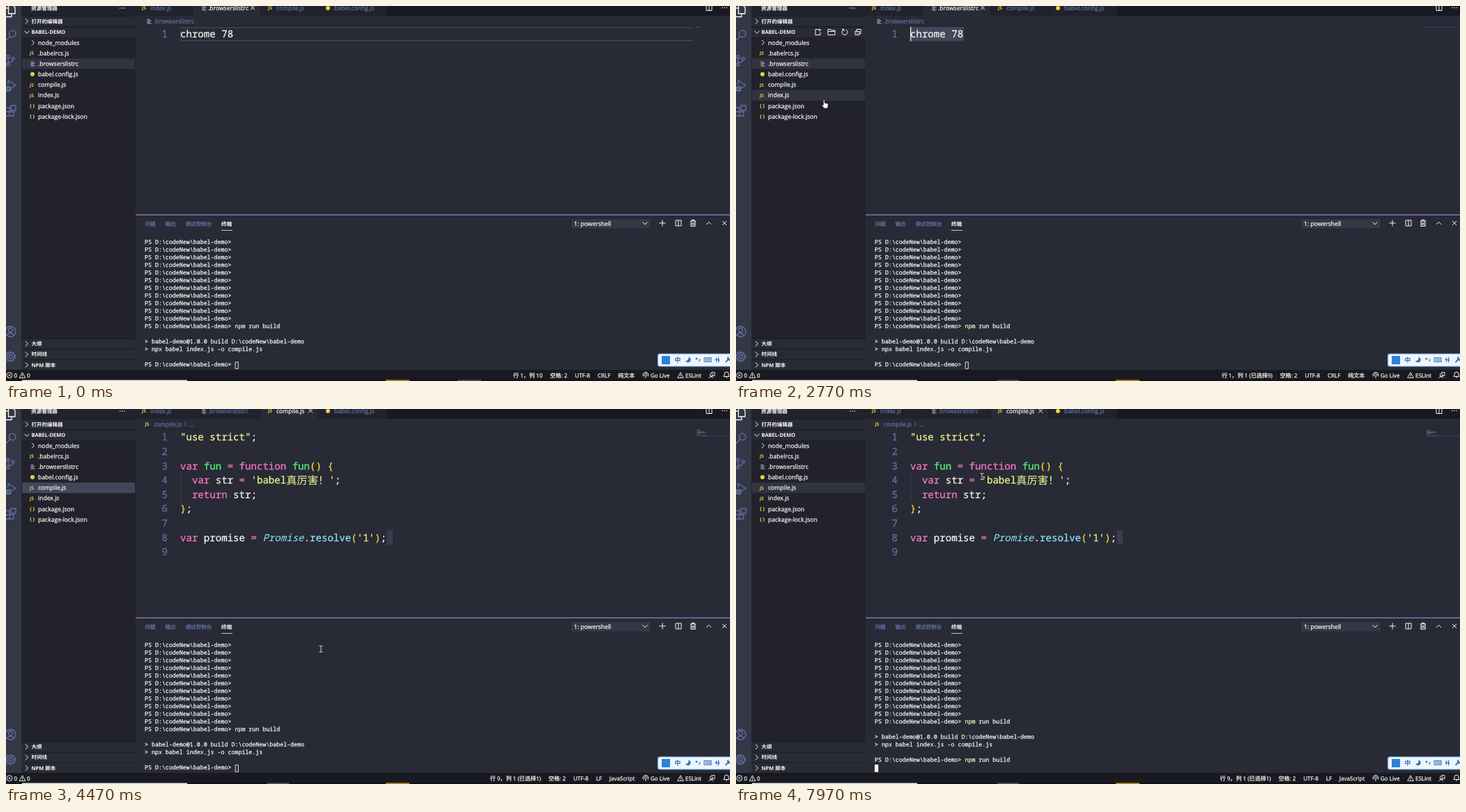
These frames come from a looping animation (1039 px wide and 539 px high, 8 s). An HTML page with a canvas:

```html
<!DOCTYPE html>
<html lang="zh">
<head>
<meta charset="utf-8">
<title>Editor</title>
<style>
html, body { margin: 0; width: 100%; height: 100%; overflow: hidden; background: #282a36; }
canvas { display: block; }
</style>
</head>
<body>
<canvas id="stage" width="1039" height="539"></canvas>
<script>
const ctx = document.getElementById('stage').getContext('2d');
const LOOP = 8000;
const UI = '"Open Sans", "Noto Sans CJK SC", "Noto Sans CJK", sans-serif';
const MONO = '"Noto Sans Mono", "Noto Sans CJK SC", "Noto Sans CJK", monospace';
const CJK = '"Noto Sans CJK SC", "Noto Sans CJK", sans-serif';
const BG = '#282a36', SIDE = '#21222c', DARK = '#191a21', WHITE = '#f8f8f2',
  DIM = '#6272a4', SELECT = '#44475a', SOFT = '#313341', YELLOW = '#e6d33c';
const LINE = 20.6, ROW = 15.17;

// Pointer phases: start, end, number of steps, then (step, x, y) points.
const moves = [
  [130, 670, 8, 0, 908, 519, 3, 760, 380, 7, 515, 163],
  [830, 1620, 11, 0, 460, 130, 4, 330, 41, 7, 329, 40, 10, 280, 38],
  [1680, 1760, 2, 0, 256, 36, 1, 239, 36],
  [1990, 2370, 6, 0, 238, 40, 5, 234, 155],
  [2540, 3310, 11, 0, 180, 150, 3, 128, 141, 7, 86, 133, 10, 84, 131],
  [3380, 3610, 4, 0, 83, 131, 3, 82, 117],
  [3850, 3850, 1, 0, 89, 115],
  [4000, 4790, 11, 0, 90, 123, 3, 86, 119, 4, 240, 225, 6, 452, 345, 10, 453, 361],
  [4870, 4940, 2, 0, 452, 355, 1, 451, 350],
  [6650, 6960, 5, 0, 456, 330, 2, 520, 240, 4, 493, 187],
  [7110, 7890, 11, 0, 480, 180, 4, 264, 150, 7, 300, 84, 10, 368, 130],
  [7970, 7970, 1, 0, 353, 97]
];
const presses = [[1300, 1990], [3150, 3310], [4158, 4237], [4632, 4790]];

const files = [
  ['node_modules', 'dir'], ['.babelrcs.js', 'js'], ['.browserslistrc', 'list'],
  ['babel.config.js', 'dot'], ['compile.js', 'js'], ['index.js', 'js'],
  ['package.json', 'json'], ['package-lock.json', 'json']
];
const tabs = [
  [186, 268, 195, 207, 256, 'index.js', 'js'],
  [268, 366, 280, 290, 354, '.browserslistrc', 'list'],
  [366, 449, 376, 388, 437, 'compile.js', 'js'],
  [449, 547, 458, 471, 538, 'babel.config.js', 'dot']
];

// "~" starts a token, the next letter is its colour.
const inks = { w: WHITE, p: '#ff79c6', g: '#50fa7b', c: '#8be9fd', i: '#8be9fd',
  s: '#f1fa8c', z: '#f1fa8c', b: '#ffd82a' };
const call = "~wpromise ~p= ~iPromise~w.~cresolve~b(~s'1'~b)~w;";
const str = "~wstr ~p= ~s'babel~z真厉害！~s'~w;";
const docs = {
  list: { row: 2, tab: 1, lang: '纯文本', eol: 'CRLF', code: ['~wchrome 78'] },
  index: { row: 5, tab: 0, lang: 'JavaScript', eol: 'CRLF', guide: 1, code: [
    '~pconst ~gfun ~p= ~b() ~p=> ~b{', '~p  let ' + str, '~p  return ~wstr;',
    '~b}', '~plet ' + call] },
  compile: { row: 4, tab: 2, lang: 'JavaScript', eol: 'LF', guide: 3, code: [
    '~s"use strict"~w;', '', '~pvar ~gfun ~p= function ~gfun~b() {', '~p  var ' + str,
    '~p  return ~wstr;', '~b}~w;', '', '~pvar ' + call, ''] }
};

function rect(x, y, w, h, color) {
  ctx.fillStyle = color;
  ctx.fillRect(x, y, w, h);
}
function disc(x, y, r, color) {
  ctx.fillStyle = color;
  ctx.beginPath();
  ctx.arc(x, y, r, 0, 7);
  ctx.fill();
}
function stroke(d, color = WHITE, width = 1, x = 0, y = 0) {
  ctx.save();
  ctx.translate(x, y);
  ctx.strokeStyle = color;
  ctx.lineWidth = width;
  ctx.stroke(new Path2D(d));
  ctx.restore();
}
// Draws slightly emboldened text centred on y and returns its width.
function text(s, x, y, color = WHITE, size = 8.6, family = UI, style = '') {
  ctx.font = `${style} ${size}px ${family}`;
  ctx.fillStyle = ctx.strokeStyle = color;
  ctx.lineWidth = .25;
  ctx.fillText(s, x, y + size * .35);
  if (!style) ctx.strokeText(s, x, y + size * .35);
  return ctx.measureText(s).width;
}
const chevRight = (x, y) => stroke('M-2-3.5L1.5 0L-2 3.5', WHITE, 1, x, y);
const chevDown = (x, y) => stroke('M-3.5-2L0 1.5L3.5-2', WHITE, 1, x, y);
const cross = (x, y) => stroke('M-3-3L3 3M3-3L-3 3', WHITE, 1, x, y);
const dots = (x, y) => [-3.3, 0, 3.3].forEach(d => disc(x + d, y, .8, WHITE));
const splitIcon = (x, y) => stroke('M-4-4H4V4H-4ZM0-4V4', WHITE, 1, x, y);

function fileIcon(kind, x, y) {
  if (kind === 'js') text('JS', x, y, YELLOW, 6.6, UI, 'bold');
  if (kind === 'json') text('{ }', x, y - .3, YELLOW, 7, UI, 'bold');
  if (kind === 'dot') disc(x + 4, y, 3, YELLOW);
  if (kind === 'list') stroke('M1-2.6H5M1-.6H7M1 1.2H5M1 3H7', '#c5c8d6', .9, x + .5, y);
  if (kind === 'dir') chevRight(x + 5, y);
}

function pointer(t) {
  const m = moves.filter(v => v[0] <= t).pop();
  if (!m) return null;
  const [from, to, count, ...p] = m;
  const gap = count > 1 ? (to - from) / (count - 1) : 1;
  const step = Math.min(count - 1, Math.floor((t - from) / gap + .06));
  let k = 0;
  while (k + 3 < p.length && p[k + 3] <= step) k += 3;
  if (k + 3 >= p.length) return { x: p[k + 1], y: p[k + 2] };
  const f = (step - p[k]) / (p[k + 3] - p[k]);
  return { x: p[k + 1] + f * (p[k + 4] - p[k + 1]), y: p[k + 2] + f * (p[k + 5] - p[k + 2]) };
}

function activityBar() {
  rect(0, 0, 22, 523, '#343746');
  stroke('M3.5-2V11H13V2L10-1M3 3H-2V15.5H8V11', WHITE, 1.3);
  const icon = (d, y) => stroke(d, DIM, 1.3, 6, y);
  icon('M8-2A4.8 4.8 0 1 1-1.6-2A4.8 4.8 0 1 1 8-2M-.2 1.6L-6 7.5', 42);
  icon('M-5-5A2 2 0 1 1-1-5A2 2 0 1 1-5-5M-3-3V4M-5 6A2 2 0 1 1-1 6A2 2 0 1 1-5 6M2-2A2 2 0 1 1 6-2A2 2 0 1 1 2-2M4 0Q4 3-3 3', 78);
  icon('M-3-1V-7L8 0L0 5M-5 2H0V8H-5ZM-7 4H2M-7 7H2', 114);
  icon('M1-7H8V0H1ZM-6-4H-1V8H-6M-6 2H5V8H-6', 150);
  icon('M8 0A7.5 7.5 0 1 1-7 0A7.5 7.5 0 1 1 8 0M3.5-2A3 3 0 1 1-2.5-2A3 3 0 1 1 3.5-2M-4.5 6Q.5-2 5.5 6', 468);
  icon('M3 0A2.5 2.5 0 1 1-2 0A2.5 2.5 0 1 1 3 0', 504);
  ctx.setLineDash([2.9, 1.6]);
  icon('M7.5 0A7 7 0 1 1-6.5 0A7 7 0 1 1 7.5 0', 504);
  ctx.setLineDash([]);
  icon('M6 0A5.5 5.5 0 1 1-5 0A5.5 5.5 0 1 1 6 0', 504);
}

function sidebar(doc, mouse, focused) {
  rect(22, 0, 164, 523, SIDE);
  text('资源管理器', 36, 3, WHITE, 7.6);
  dots(167, 3);
  const section = (name, y, open) => {
    rect(22, y - 7.4, 164, 14.6, BG);
    rect(22, y - 8, 164, .8, DARK);
    open ? chevDown(30, y) : chevRight(30, y);
    text(name, 36.5, y, WHITE, 7.5, UI, 'bold');
  };
  section('打开的编辑器', 22);
  section('BABEL-DEMO', 37.8, true);
  section('大纲', 485.5);
  section('时间线', 500.8);
  section('NPM 脚本', 516);

  const inside = mouse && mouse.x < 185;
  const hover = inside ? Math.floor((mouse.y - 51) / ROW) : -1;
  files.forEach(([name, kind], i) => {
    const y = 52.6 + i * ROW;
    if (i === doc.row) rect(23, y - 7.6, 162, ROW, focused ? SELECT : SOFT);
    else if (i === hover) rect(23, y - 7.6, 162, ROW, SOFT);
    fileIcon(kind, 34, y);
    text(name, 46, y);
  });
  if (!inside) return;
  stroke('M1-4H-3V4H4V0M3-5V-1M1-3H5', WHITE, 1, 117, 37.5);
  stroke('M-5 4V-4H-1L0-2.5H5V4ZM-5-1H5', WHITE, 1, 137, 37.5);
  stroke('M2-3.5A4 4 0 1 1-2-3.5M-4-4H-1V-1', WHITE, 1, 156, 37.5);
  stroke('M-4-1H2V4H-4ZM-2-1V-4H4V2H2M-2 1.5H0', WHITE, 1, 175, 37.5);
}

function editor(doc, t) {
  rect(186, 0, 853, 14, DARK);
  tabs.forEach(([left, right, iconX, textX, closeX, name, kind], i) => {
    const active = i === doc.tab;
    rect(left, 0, right - left - .6, 14, active ? BG : SIDE);
    fileIcon(kind, iconX, 3);
    text(name, textX, 3, active ? WHITE : DIM);
    if (active) cross(closeX, 2.5);
  });
  splitIcon(1009, 2.5);
  dots(1031, 2.5);

  const [, , , , , name, kind] = tabs[doc.tab];
  fileIcon(kind, kind === 'js' ? 199.5 : 201, 22);
  const w = text(name, 212, 22, DIM);
  if (kind === 'js') {
    stroke('M-1.5-3L1.5 0L-1.5 3', DIM, .9, 212 + w + 5, 22);
    text('...', 212 + w + 11, 22, DIM);
  }
  rect(186, 29, 853, .7, '#222430');

  const dropped = t >= 1760 ? 0 : 1;
  const selecting = doc === docs.list && t >= 1680;
  const last = doc.code.length - 1;
  if (selecting) rect(250 + dropped * 8.46, 30, 77 - dropped * 8.46, 20.5, SELECT);
  else if (doc === docs.compile) rect(546.5, 174.3, 8.5, LINE, '#3b3d4c');
  else {
    const y = 30.4 + last * LINE;
    rect(250, y, 736, 1.4, SELECT);
    rect(250, y + 18.6, 736, 1.4, SELECT);
    rect(250, y, 1, 20, SELECT);
  }
  if (doc.guide) rect(250.5, 30 + doc.guide * LINE, .8, LINE * 2, SELECT);

  doc.code.forEach((line, i) => {
    const y = 40.4 + i * LINE;
    ctx.textAlign = 'right';
    text(i + 1, 232, y, DIM, 14.1, MONO);
    ctx.textAlign = 'left';
    let x = 250;
    line.split('~').slice(1).forEach(token => {
      const ink = token[0], wide = ink === 'z';
      x += text(token.slice(1), x, y, inks[ink], wide ? 15.3 : 14.1, wide ? CJK : MONO,
        wide ? '300' : ink === 'i' ? 'italic' : '');
    });
    // Minimap
    if (line && doc !== docs.list) rect(991 + (/^~p  /.test(line) ? 1 : 0), 30.5 + i * 1.05,
      Math.min(15, line.length / 3), .6, '#858692');
  });
  if (selecting) {
    rect(250 + dropped * 8.46, 30, 1.3, 20.5, WHITE);
    rect(990, 30, 49, .8, '#2f4a70');
  } else if (doc === docs.list) rect(991, 30, 5, .8, '#56607a');
  else rect(990, 30 + last * 1.05, 49, .9, '#2f4a70');
}

function terminal(t) {
  rect(186, 299.6, 853, 1.2, '#9f7fd4');
  [['问题', 199.5], ['输出', 228.5], ['调试控制台', 257.5], ['终端', 309]].forEach(([s, x], i) =>
    text(s, x, 313, i === 3 ? WHITE : DIM, 7.6));
  rect(309, 322, 16, .9, '#d5d5d5');
  rect(810, 305, 116, 16, DARK);
  rect(810.7, 305.7, 114.6, 14.6, '#343746');
  text('1: powershell', 815, 313);
  chevDown(917, 312.5);
  stroke('M-4.5 0H4.5M0-4.5V4.5', WHITE, 1, 942, 312);
  splitIcon(965, 312);
  stroke('M-4-3H4M-1.5-3V-4.5H1.5V-3M-3-3V4.5H3V-3M-1-1V3M1-1V3', WHITE, 1.1, 986, 312);
  stroke('M-3.5 2L0-1.5L3.5 2', WHITE, 1, 1008.5, 312);
  cross(1031, 312);

  const prompt = 'PS D:\\codeNew\\babel-demo>', cmd = prompt + ' npm run build';
  const rows = [...Array(t < 5950 ? 11 : 10).fill(prompt), cmd, '',
    '> babel-demo@1.0.0 build D:\\codeNew\\babel-demo',
    '> npx babel index.js -o compile.js', '', t < 5490 ? prompt : cmd];
  rows.forEach((s, i) => {
    const y = 339.5 + i * 11;
    const [head, tail] = s.split(' npm run');
    const w = text(head, 199, y, WHITE, 8.3, MONO);
    if (tail) {
      const npm = text(' npm', 199 + w, y, '#f5f8c0', 8.3, MONO);
      text(' run' + tail, 199 + w + npm, y, WHITE, 8.3, MONO);
    }
  });
  const x = t < 5490 ? 328.6 : t < 5950 ? 393.6 : 199;
  if (t < 4711) stroke('M.5.5H4.7V10H.5Z', WHITE, .9, x, 511.3);
  else rect(x, 511, 5.2, 10.8, WHITE);
}

function statusBar(doc, t) {
  rect(0, 523, 1039, 16, DARK);
  stroke('M4 0A4 4 0 1 1-4 0A4 4 0 1 1 4 0M-1.7-1.7L1.7 1.7M1.7-1.7L-1.7 1.7', WHITE, .9, 5, 530.7);
  text('0', 11.5, 531, WHITE, 8);
  const warn = x => stroke('M0-4L4.3 3.7H-4.3ZM0-1.5V1.3M0 2V3', WHITE, .9, x, 530.7);
  warn(23.5);
  text('0', 30, 531, WHITE, 8);

  const place = doc === docs.index ? '行 5，列 36' : doc === docs.compile ? '行 9，列 1 (已选择1)'
    : t < 1680 ? '行 1，列 10' : t < 1760 ? '行 1，列 2 (已选择8)' : '行 1，列 1 (已选择9)';
  let right = 902.3;
  ctx.textAlign = 'right';
  for (const s of [doc.lang, doc.eol, 'UTF-8', '空格: 2', place])
    right -= text(s, right, 531, WHITE, 8.05) + 10.8;
  ctx.textAlign = 'left';

  stroke('M3.4 2A4 4 0 1 0-3.4 2M1.6 1A2 2 0 1 0-1.6 1M0 0V4.5', WHITE, 1, 918, 530.5);
  text('Go Live', 925, 531, WHITE, 8);
  warn(968);
  text('ESLint', 975, 531, WHITE, 8);
  stroke('M-1-4H4V1H1L-1 3V1M1.2-.5A2 2 0 1 1-2.8-.5A2 2 0 1 1 1.2-.5M-4.5 4.5Q-1-1 2 4.5', WHITE, .9, 1013, 530.5);
  stroke('M-4 2.5H4L3 0V-1A3 3 0 0 0-3-1V0ZM-1 4H1', WHITE, 1, 1034, 530);

  rect(0, 537.4, 1039, 1.6, '#101116');
  rect(23, 537.6, 237, 1.4, '#f0f0f0');
  rect(545, 537.4, 34, 1.6, '#c48a1c');
  rect(t < 830 ? 648 : 375, 537.4, t < 830 ? 34 : 31, 1.6, '#55565a');
}

function inputBar() {
  const blue = '#2f72bd';
  ctx.beginPath();
  ctx.roundRect(935.5, 500, 115, 18, 3);
  ctx.fillStyle = '#eff5fd';
  ctx.fill();
  ctx.strokeStyle = '#7ba9dd';
  ctx.lineWidth = 1.2;
  ctx.stroke();
  rect(941, 503, 12, 12, '#2b83d8');
  text('中', 959.3, 508.7, blue, 9.2, CJK, 'bold');
  ctx.fillStyle = blue;
  ctx.fill(new Path2D('M979.5 504.5A4 4 0 1 1 975 510Q980 510 979.5 504.5'));
  stroke('M-1-2A1 1 0 1 1-3-2A1 1 0 1 1-1-2M3-2Q3 1 1.5 2', blue, 1.1, 993, 509);
  stroke('M-5-3H5V3H-5ZM-3.5-1H4M-3.5 1H4', blue, 1.1, 1007, 508.5);
  stroke('M-3 0H3M-1.5-3V3M1.5-4V4M-3 0L-1.5-2M3 0L1.5 2', blue, 1.2, 1021, 508.5);
  stroke('M-3.5 3.5L2-2M4-3A2.3 2.3 0 1 1 1-4', blue, 1.8, 1036, 508.5);
}

function drawPointer(mouse, t) {
  if (!mouse) return;
  const hand = mouse.x < 185;
  if (presses.some(([a, b]) => t >= a && t < b))
    disc(mouse.x - 2, mouse.y - (hand ? 5 : 0), 8, 'rgba(214,194,20,.78)');
  if (!hand) {
    stroke('M-2.5-4.5H-.6L0-4L.6-4.5H2.5M0-4V4M-2.5 4.5H-.6L0 4L.6 4.5H2.5', '#d8d8d8', 1, mouse.x, mouse.y);
    return;
  }
  ctx.save();
  ctx.translate(mouse.x, mouse.y);
  const shape = new Path2D('M-2.6 1V-5.2Q-1.7-6.6-.8-5.2V-1.6L3.5-.8Q4.4-.5 4.3.6L3.4 6H-1.6L-4.5 2Q-4.4.5-2.6 1.4Z');
  ctx.fillStyle = '#fff';
  ctx.fill(shape);
  ctx.strokeStyle = '#14151b';
  ctx.lineWidth = .6;
  ctx.stroke(shape);
  ctx.restore();
}

function draw(t) {
  const doc = t < 3380 ? docs.list : t < 4237 ? docs.index : docs.compile;
  const mouse = pointer(t);
  ctx.textRendering = 'geometricPrecision';
  ctx.lineJoin = 'round';
  rect(0, 0, 1039, 539, BG);
  activityBar();
  sidebar(doc, mouse, t >= 3380 && t < 4711);
  editor(doc, t);
  terminal(t);
  statusBar(doc, t);
  inputBar();
  drawPointer(mouse, t);
}

const start = performance.now();
function tick() {
  draw((performance.now() - start) % LOOP);
  requestAnimationFrame(tick);
}
tick();
</script>
</body>
</html>
```
